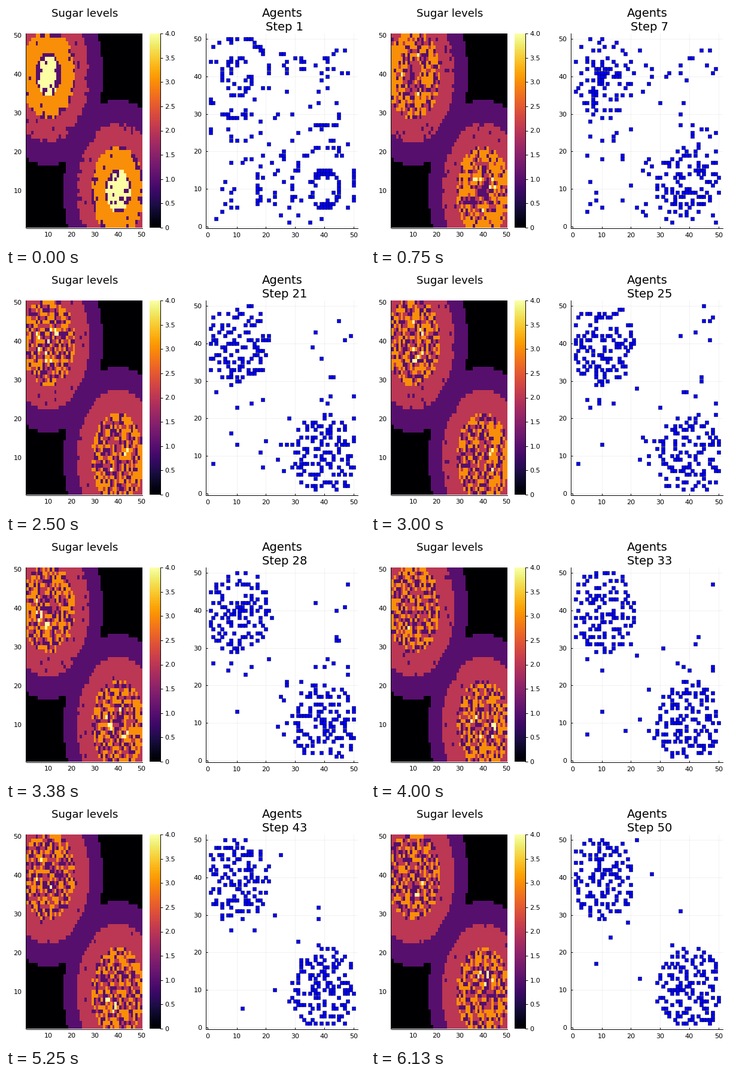
Recreate the animation shown at these times as a matplotlib script. Size 600 by 400 pixels, loop 6.26 s.

```python
import random

import matplotlib.pyplot as plt
import numpy as np
from matplotlib.animation import FuncAnimation

W, H = 600, 400
PX = 0.72  # points per pixel at 100 dpi
LINE = 0.7
SIZE, AGENTS, STEPS = 50, 250, 50
PEAKS = [(10, 40), (40, 10)]
MAX_SUGAR, BAND = 4, 6
LOOP_MS = 6260
HOLD = 4                   # frames per step
FRAMES = STEPS * HOLD + 1  # the last step stays one frame longer

plt.rcParams["font.family"] = "DejaVu Sans"
rng = random.Random(42)


# --- Sugarscape model ---------------------------------------------------

def sugar_capacity():
    x, y = np.mgrid[1:SIZE + 1, 1:SIZE + 1]
    nearest = np.min([np.rint(np.hypot(x - px, y - py)) for px, py in PEAKS], axis=0)
    return np.maximum(0, MAX_SUGAR - nearest.astype(int) // BAND)


def new_agent(occupied):
    while True:
        pos = rng.randrange(SIZE), rng.randrange(SIZE)
        if not occupied[pos]:
            break
    occupied[pos] = True
    return {"pos": pos, "vision": rng.randint(1, 6), "metabolism": rng.randint(1, 4),
            "wealth": rng.randint(5, 25), "age": 0, "max_age": rng.randint(60, 100)}


def best_site(agent, sugar, occupied):
    """Nearest free cell with the most sugar in sight, ties broken at random."""
    x, y = agent["pos"]
    v = agent["vision"]
    span = np.arange(-v, v + 1)
    xs, ys = (x + span) % SIZE, (y + span) % SIZE
    view = np.ix_(xs, ys)
    block = np.where(occupied[view], -1, sugar[view])
    top = block.max()
    if top <= 0:
        return x, y
    i, j = np.nonzero(block == top)
    ring = np.maximum(abs(i - v), abs(j - v))
    k = rng.choice(np.flatnonzero(ring == ring.min()).tolist())
    return int(xs[i[k]]), int(ys[j[k]])


def simulate():
    capacity = sugar_capacity()
    sugar = capacity.copy()
    occupied = np.zeros((SIZE, SIZE), bool)
    agents = [new_agent(occupied) for _ in range(AGENTS)]
    history = []
    for _ in range(STEPS):
        rng.shuffle(agents)
        for n, agent in enumerate(agents):
            site = best_site(agent, sugar, occupied)
            occupied[agent["pos"]] = False
            occupied[site] = True
            agent["pos"] = site
            agent["wealth"] += int(sugar[site]) - agent["metabolism"]
            agent["age"] += 1
            sugar[site] = 0
            if agent["wealth"] <= 0 or agent["age"] >= agent["max_age"]:
                occupied[site] = False
                agents[n] = new_agent(occupied)
        sugar = np.minimum(sugar + 1, capacity)
        history.append((sugar.copy(), np.array([a["pos"] for a in agents]) + 1))
    return history


# --- Drawing ------------------------------------------------------------

fig = plt.figure(figsize=(W / 100, H / 100), dpi=100, facecolor="white")


def pixel_axes(left, top, right, bottom, spines, outward=0):
    ax = fig.add_axes([left / W, 1 - bottom / H, (right - left) / W, (bottom - top) / H])
    for name, spine in ax.spines.items():
        spine.set_visible(name in spines)
        spine.set_linewidth(LINE)
        if outward and name in spines:
            spine.set_position(("outward", outward))
    return ax


def title(x, baseline, text, size=14):
    return fig.text(x / W, 1 - baseline / H, text, fontsize=size, ha="center", va="baseline")


def center_labels(ax):
    for label in ax.get_yticklabels():
        label.set_va("center_baseline")


history = simulate()

heat = pixel_axes(34, 46, 228, 371, ("left", "bottom"), outward=0.5)
image = heat.imshow(history[0][0], cmap="inferno", vmin=0, vmax=MAX_SUGAR, origin="lower",
                    aspect="auto", interpolation="nearest",
                    extent=(0.5, SIZE + 0.5, 0.5, SIZE + 0.5))
heat.set_xticks(range(10, 51, 10))
heat.set_yticks(range(10, 51, 10))
heat.tick_params(length=0, labelsize=8, pad=4.8)
center_labels(heat)
title(131.5, 18, "Sugar levels", 13.1)

bar = pixel_axes(240, 46, 258, 371, ("right",))
bar.imshow(np.linspace(0, 1, 256)[:, None], cmap="inferno", origin="lower",
           aspect="auto", extent=(0, 1, 0, MAX_SUGAR))
levels = np.arange(0, 4.1, 0.5)
bar.set_xticks([])
bar.yaxis.tick_right()
bar.set_yticks(levels, [f"{v:.1f}" if v else "0" for v in levels])
bar.tick_params(axis="y", length=4 * PX, width=LINE, labelsize=8, pad=2.4)
center_labels(bar)

field = pixel_axes(334.4, 46, 588, 371.7, ("left", "bottom"))
margin = 0.03 * (SIZE - 1)
field.set_xlim(1 - margin, SIZE + margin)
field.set_ylim(1 - margin, SIZE + margin)
field.set_xticks(range(0, 51, 10))
field.set_yticks(range(0, 51, 10))
field.set_axisbelow(True)
field.grid(color="black", alpha=0.07, linewidth=0.5)
field.tick_params(direction="in", length=3 * PX, width=LINE, labelsize=8, pad=5)
center_labels(field)
dots, = field.plot([], [], "s", markersize=5.9 * PX, color="blue",
                   markeredgecolor="black", markeredgewidth=0.5 * PX)
title(462, 18, "Agents")
step_title = title(465.5, 41, "")


def update(frame):
    step = min(frame // HOLD, STEPS - 1)
    sugar, positions = history[step]
    image.set_data(sugar)
    dots.set_data(positions[:, 0], positions[:, 1])
    step_title.set_text(f"Step {step + 1}")
    return image, dots, step_title


animation = FuncAnimation(fig, update, frames=FRAMES, interval=LOOP_MS / FRAMES,
                          repeat=True, blit=False)
plt.show()
```
